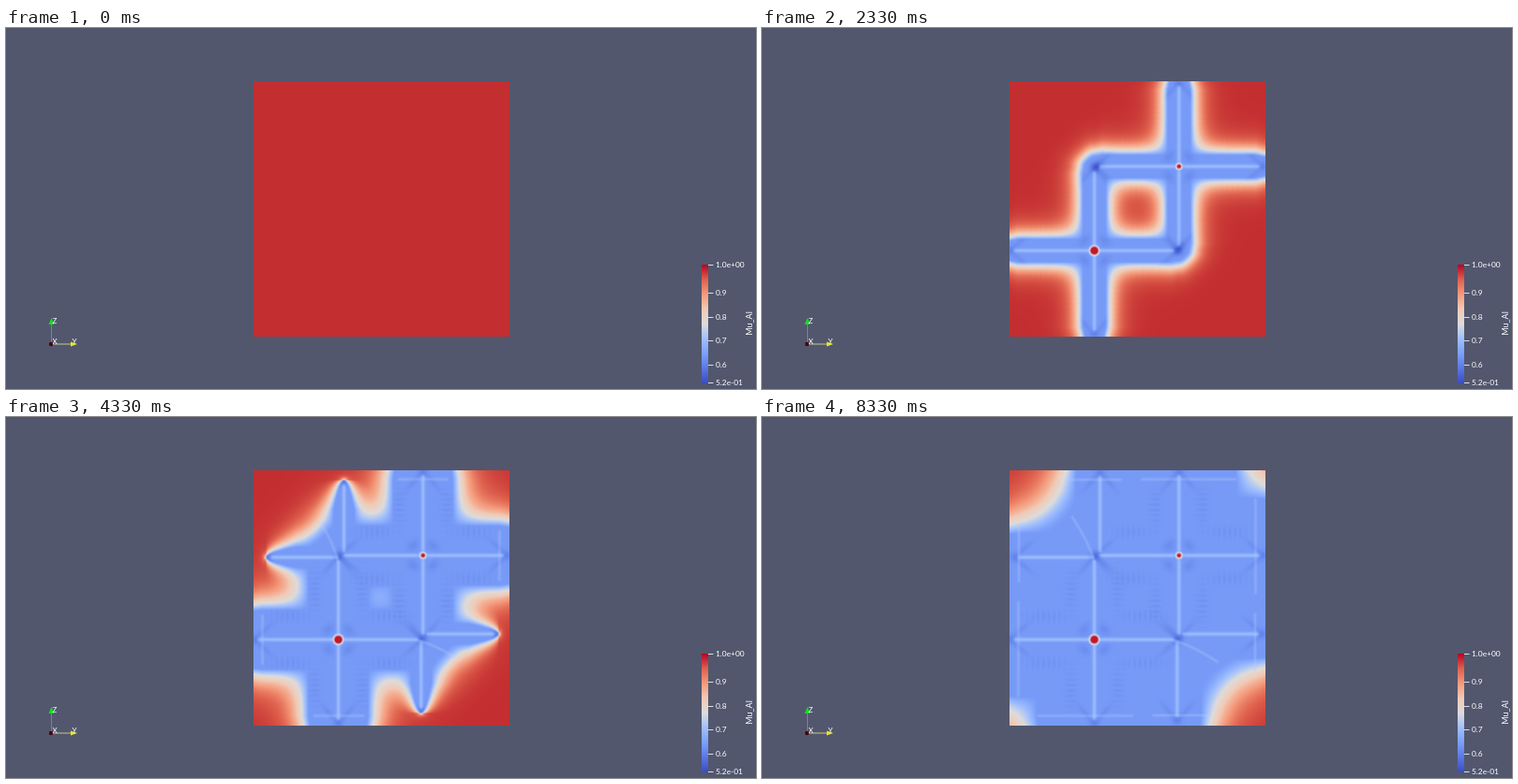
Recreate the animation shown at these times as an HTML page with a canvas. Size 800 by 386 pixels, loop 8670 ms.

```html
<!DOCTYPE html>
<html lang="en">
<head>
<meta charset="utf-8">
<title>Dendrite growth</title>
<style>
  html, body { margin: 0; width: 100%; height: 100%; overflow: hidden; background: #52576e; }
  canvas { display: block; }
</style>
</head>
<body>
<canvas id="stage" width="800" height="386"></canvas>
<script>
const ctx = document.getElementById('stage').getContext('2d');
const LOOP = 8670, SIZE = 273, LEFT = 263.5, TOP = 56.5, HALF = SIZE / 2;
const COOL_WARM = [
  [59, 76, 192], [89, 119, 228], [123, 159, 249], [160, 191, 254], [221, 220, 219],
  [241, 202, 182], [244, 154, 123], [222, 96, 77], [180, 4, 38]
];
const FIELD_COLORS = [...COOL_WARM.slice(0, 8), [195, 46, 48]];
const SOLID = 0.235;
// The pattern repeats across both diagonals of the square.
const MIRRORS = [[1, 0, 0, 1], [0, -1, -1, 0], [0, 1, 1, 0], [-1, 0, 0, -1]];

const clamp = (v, lo, hi) => Math.min(Math.max(v, lo), hi);
const bell = v => Math.abs(v) > 3 ? 0 : Math.exp(-v * v);

// Arms start at a point and grow along one axis; coordinates are relative to the square's centre.
const seeds = [{ x: -45.5, y: 45, r: 4.3 }, { x: 44.8, y: -45, r: 2.3 }];
const arms = [];
for (const { x, y } of seeds)
  for (const [dx, dy] of [[1, 0], [-1, 0], [0, 1], [0, -1]])
    arms.push({ x, y, dx, dy, speed: 18.2, start: 0, width: 9, power: 0.69,
                stop: x * dx + y * dy < 0 ? 90 : Infinity });
for (const [x, y, dx, dy] of [[-39.5, -44, 0, -1], [-41, -43, -1, 0], [44, 39, 1, 0], [42.8, 42, 0, 1]])
  arms.push({ x, y, dx, dy, speed: 13, start: 6.7, width: 10, power: 0.5, stop: Infinity, sprout: true });

function fieldValue(x, y, active) {
  let liquid = 1, detail = 0;
  for (const arm of active) {
    const px = x - arm.x, py = y - arm.y;
    const a = px * arm.dx + py * arm.dy, b = Math.abs(px * arm.dy - py * arm.dx);
    const along = clamp(a, 0, arm.reach);
    const age = Math.max(0, Math.min(arm.time - along / arm.speed, arm.cap));
    const depth = 3 + 4.2 * Math.sqrt(age);
    const gap = Math.hypot(b, 1.5 * (a - along)) - arm.width * age ** arm.power + depth / 2;
    liquid *= gap > 0 ? 1 - Math.exp(-gap / depth) : 0;

    const end = Math.min(arm.reach, 91);
    if (a < 0 || a > end + 8 || b > 40) continue;
    detail += 0.13 * bell(b / 1.9) * clamp((a - 3) / 3, 0, 1) * clamp((end - 4 - a) / 3, 0, 1);
    detail -= 0.06 * bell(Math.hypot(a - end + 1, b) / 5);
    if (end > 60 && a < end) {
      detail -= 0.035 * bell((b - (end - a) * 0.8) / 3.5) * bell((a - 80) / 10);
      if (!arm.sprout)
        detail -= 0.03 * Math.sin(a * 0.55) ** 2 * bell((b - 25) / 6) * bell((a - 52) / 20);
    }
  }
  for (const s of seeds) {
    const px = x - s.x, py = y - s.y, r2 = px * px + py * py;
    if (r2 < 900) detail -= 0.04 * bell((Math.sqrt(r2) - 15) / 5) * (2 * px * py / (r2 + 0.01)) ** 2;
  }
  return SOLID + (1 - SOLID) * liquid + detail * (1 - liquid);
}

function line(c, ...points) {
  c.beginPath();
  points.forEach(([x, y]) => c.lineTo(x, y));
  c.stroke();
}

function disc(c, x, y, r, color) {
  c.fillStyle = color;
  c.beginPath();
  c.arc(x, y, r, 0, 7);
  c.fill();
}

function drawRidges(c, step) {
  c.lineWidth = 3;
  c.lineCap = 'round';
  c.strokeStyle = 'rgba(185,208,255,.27)';
  MIRRORS.forEach((m, i) => {
    c.setTransform(...m, HALF, HALF);
    const bar = (step - 7) * 4.3, small = (step - 15) * 4;
    if (bar > 0) line(c, [45 - Math.min(bar, 40), -126.5], [45 + Math.min(bar, 60), -126.5]);
    if (small > 0) line(c, [-39.5 - Math.min(small, 38), -126], [-39.5 + Math.min(small, 22), -126]);
    if (i < 2 && step > 10) {
      c.beginPath();
      c.moveTo(-45.5, -38);
      c.quadraticCurveTo(-51, -59, step > 20 ? -69 : -64, step > 20 ? -86 : -79);
      c.stroke();
    }
  });
  c.setTransform(1, 0, 0, 1, HALF, HALF);
  for (const { x, y, r } of seeds) {
    disc(c, x, y, r + 2.4, 'rgba(190,208,250,.6)');
    disc(c, x, y, r + 1.2, '#e9dedb');
    disc(c, x, y, r, '#be1a2c');
  }
}

function renderField(step) {
  const canvas = document.createElement('canvas');
  canvas.width = canvas.height = SIZE;
  const c = canvas.getContext('2d');
  const active = arms.filter(arm => step > arm.start).map(arm => {
    const time = step - arm.start;
    const cap = Math.max(time - 82 / arm.speed, Math.min(time / 2, 2.5));
    return { ...arm, time, cap, reach: Math.min(arm.speed * time, arm.stop) };
  });
  if (!step) {
    c.fillStyle = `rgb(${FIELD_COLORS[8]})`;
    c.fillRect(0, 0, SIZE, SIZE);
    return canvas;
  }
  const image = c.createImageData(SIZE, SIZE);
  for (let i = 0; i < SIZE * SIZE; i++) {
    const x = i % SIZE + 0.5 - HALF, y = Math.floor(i / SIZE) + 0.5 - HALF;
    const v = clamp(fieldValue(x, y, active), 0, 1) * 8, k = Math.min(7, Math.floor(v));
    for (let ch = 0; ch < 3; ch++) {
      const from = FIELD_COLORS[k][ch];
      image.data[i * 4 + ch] = from + (FIELD_COLORS[k + 1][ch] - from) * (v - k);
    }
    image.data[i * 4 + 3] = 255;
  }
  c.putImageData(image, 0, 0);
  drawRidges(c, step);
  return canvas;
}

function label(text, x, y, size = 8) {
  ctx.font = `${size}px Lato, sans-serif`;
  ctx.fillStyle = '#fff';
  ctx.fillText(text, x, y);
}

function drawLegend() {
  const gradient = ctx.createLinearGradient(0, 380, 0, 253);
  COOL_WARM.forEach((color, i) => gradient.addColorStop(i / 8, `rgb(${color})`));
  ctx.fillStyle = gradient;
  ctx.fillRect(742, 253, 7, 127);
  ctx.textBaseline = 'middle';
  ctx.strokeStyle = '#dcdde3';
  ctx.lineWidth = 1;
  const ticks = [['1.0e+00', 253.5], ['5.2e-01', 379.5]];
  for (let i = 0; i < 4; i++) ticks.push([(0.9 - i / 10).toFixed(1), 283.5 + Math.round(i * 25.6)]);
  for (const [text, y] of ticks) {
    line(ctx, [749, y], [754.5, y]);
    label(text, 757, y, 8.4);
  }
  ctx.save();
  ctx.translate(793, 316);
  ctx.rotate(-Math.PI / 2);
  ctx.textAlign = 'center';
  label('Mu_Al', 0, 0, 9);
  ctx.restore();
}

function arrowHead(color, ...points) {
  ctx.fillStyle = color;
  ctx.beginPath();
  points.forEach(([x, y]) => ctx.lineTo(x, y));
  ctx.fill();
}

function drawAxes() {
  ctx.lineWidth = 1;
  ctx.strokeStyle = '#1fc52c';
  line(ctx, [48.5, 337], [48.5, 315]);
  arrowHead('#12e01e', [45.5, 317], [48.5, 310], [51.5, 317]);
  ctx.strokeStyle = '#c3c48c';
  line(ctx, [50, 338], [70, 338]);
  arrowHead('#e8e81c', [69, 335.5], [76, 338], [69, 340.5]);
  disc(ctx, 48, 338, 2.2, '#4a0508');
  label('Z', 49.5, 314);
  label('X', 49.5, 335.5);
  label('Y', 70.5, 335.5);
}

const fields = [];
let shown = -1;
function tick(now) {
  const t = now % LOOP, part = t % 1000;
  const step = 3 * Math.floor(t / 1000) + (part >= 330) + (part >= 670);
  if (step !== shown) {
    shown = step;
    fields[step] ??= renderField(step);
    ctx.fillStyle = '#52576e';
    ctx.fillRect(0, 0, 800, 386);
    ctx.drawImage(fields[step], LEFT, TOP);
    drawLegend();
    drawAxes();
  }
  requestAnimationFrame(tick);
}
requestAnimationFrame(tick);
</script>
</body>
</html>
```
